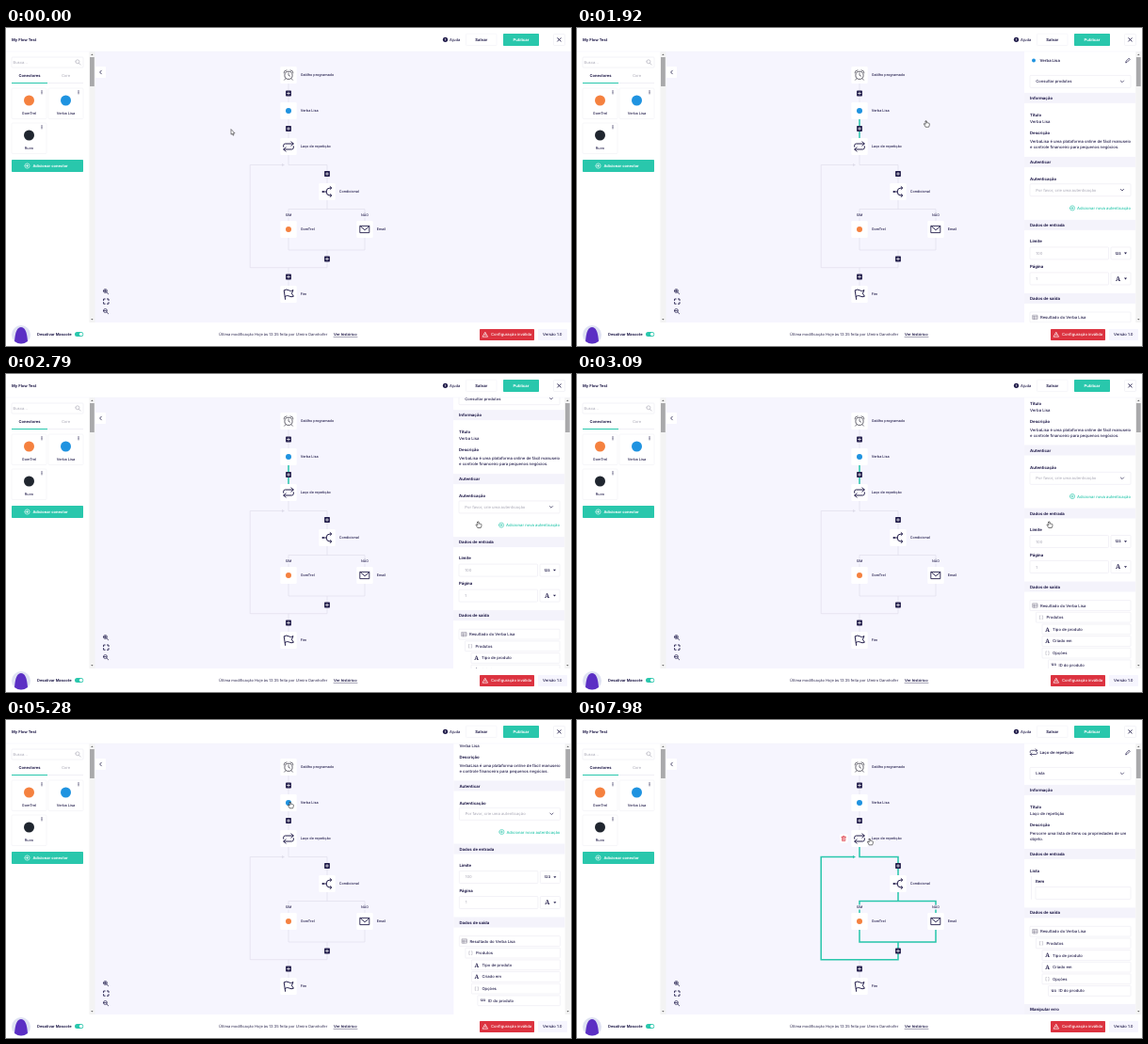
An HTML page for the animation above (8000 ms loop, 600 px wide and 338 px high).

```html
<!DOCTYPE html>
<html lang="pt-BR">
<head>
<meta charset="utf-8">
<title>Editor de fluxo</title>
<style>
html, body { margin: 0; width: 100%; height: 100%; overflow: hidden; background: #fff; }
svg { display: block; width: 600px; height: 338px; }
text { font-family: Inter, "Open Sans", sans-serif; text-rendering: geometricPrecision; white-space: pre; }
</style>
</head>
<body>
<svg id="stage" viewBox="0 0 600 338" xmlns="http://www.w3.org/2000/svg"></svg>
<script>
const INK = '#221d4b', TEAL = '#29c7ac', GREY = '#b3b2be', EDGE = '#dddbe9', LINE = '#e6e5ee',
      BACK = '#f6f5fe', RED = '#dc3340', BLUE = '#1f93e0', ORANGE = '#f5813f';
const APP = 'Verba Lisa', CRM = 'GomTrel';

// Drawing helpers: y of a text is its vertical centre.
const text = (x, y, s, size = 4.2, fill = INK, weight = 450, extra = '') =>
  `<text x="${x}" y="${y + size * .36}" font-size="${size}" fill="${fill}" font-weight="${weight}" ${extra}>${s}</text>`;
const bold = (x, y, s, size = 4.3, fill = INK, extra = '') => text(x, y, s, size, fill, 700, extra);
const MID = 'text-anchor="middle"';
const rect = (x, y, w, h, fill, r = 0, stroke = 'none') =>
  `<rect x="${x}" y="${y}" width="${w}" height="${h}" rx="${r}" fill="${fill}" stroke="${stroke}" stroke-width=".5"/>`;
const dot = (x, y, r, fill) => `<circle cx="${x}" cy="${y}" r="${r}" fill="${fill}"/>`;
const path = (d, stroke = INK, w = .8, fill = 'none') =>
  `<path d="${d}" fill="${fill}" stroke="${stroke}" stroke-width="${w}" stroke-linejoin="round" stroke-linecap="round"/>`;
const at = (x, y, body, k = 1) => `<g transform="translate(${x} ${y}) scale(${k})">${body}</g>`;
const group = (id, body) => `<g id="${id}">${body}</g>`;
const chevron = (x, y) => path(`M${x - 1.6} ${y - .8}l1.6 1.6 1.6 -1.6`, INK, .7);
const caret = (x, y) => `<path d="M${x - 1.5} ${y - .8}h3l-1.5 1.8z" fill="${INK}"/>`;

const icons = {
  loop: path('M-5.3 .2v-1.4q0-1.8 1.8-1.8h8.6M3-5.2l2.2 2.2L3-.8M5.3-.2v1.4q0 1.8-1.8 1.8h-8.6M-3 5.2l-2.2-2.2L-3 .8', INK, 1),
  branch: dot(-4.4, 0, 1.1, INK) + path('M-4 0h3M4.6-4H3Q-.8-4-.8 0T3 4h1.6M3.2-5.4l1.5 1.4-1.5 1.4M3.2 2.6l1.5 1.4-1.5 1.4', INK, 1),
  mail: path('M-4.8-3.6h9.6v7.2h-9.6zM-4.8-3.4L0 .8l4.8-4.2', INK, .9),
  flag: path('M-3.4 5.4L-4.8-4.2Q-2-5.8 .2-4.2T5-4.4L3.4-.8 5.4 2.2Q3 3.4 .8 2T-3.8 2.4', INK, 1),
  alarm: path('M-5-2.2q0-3 3-3M5-2.2q0-3-3-3M-3 3.6l-1.4 1.6M3 3.6l1.4 1.6M0-2v2.2l1.6 1', '#55535f', .8)
    + '<circle r="4.1" cy=".3" fill="none" stroke="#55535f" stroke-width=".9"/>',
  table: path('M-2.4-2.2h4.8v4.4h-4.8zM-2.4-.8h4.8M-2.4 .7h4.8M-.8-.8v3', '#5d5a72', .4),
  braces: path('M-1-1.8h-.6v3.6h.6M1-1.8h.6v3.6h-.6', '#908da0', .4),
  letter: `<text y="2.2" font-size="6.2" font-weight="700" fill="${INK}" ${MID} style="font-family:'Noto Serif',serif">A</text>`,
  digits: bold(0, 0, '123', 3.3, INK, MID),
  trash: path('M-2.3-1.7h4.6M-.8-1.8v-.8h1.6v.8M-1.8-1.6l.2 4.2h3.2l.2-4.2M-.6-.5v2M.6-.5v2', RED, .65),
  pencil: path('M-2.2 2.2l.4-1.5L1.1-2.2l1.1 1.1-2.9 2.9z', INK, .7),
  hand: path('M-.8 .7V4L-1.9 3.2Q-2.8 3-2.5 3.8L-.8 6.8H2.6Q3.4 5.4 3.4 3.4 3.3 2.7 2.5 2.7 1.6 2.2 .6 2.5V.7Q-.1-.3-.8 .7z', '#222', .6, '#fff'),
  arrow: path('M0 0v5.2l1.2-1 .9 2 .9-.4-.9-1.9h1.6z', '#222', .55, '#fff')
};

const node = (x, y, body, label) =>
  rect(x - 8.7, y - 8.9, 17.4, 17.8, '#fff', 1.2) + at(x, y, body) + text(x + 12.7, y, label, 3.76);
const plus = (x, y) => rect(x - 2.9, y - 2.9, 5.8, 5.8, INK, .7) + path(`M${x - 1.4} ${y}h2.8M${x} ${y - 1.4}v2.8`, '#fff', .7);
const plusRing = (x, y, c) => path(`M${x - 2.6} ${y}a2.6 2.6 0 1 0 5.2 0a2.6 2.6 0 1 0 -5.2 0M${x - 1.2} ${y}h2.4M${x} ${y - 1.2}v2.4`, c, .6);
const lens = (x, y, c, sign = '') => path(`M${x - 2.6} ${y - .5}a2 2 0 1 0 4 0a2 2 0 1 0 -4 0M${x + .9} ${y + 1}l1.8 1.8${sign}`, c, .7);

const LOOP = 'M300 135V145.5H341V165M341 183V192.5M300 205V192.5H381V205M300 223V236H381V223M341 236V254.7H259.2V145.5H294';
const loopEdges = (c, w) => `<path d="${LOOP}" fill="none" stroke="${c}" stroke-width="${w}"/>`
  + `<path d="M293 144l3 1.5-3 1.5z" fill="${c}"/>`;
const branchTag = (x, s) => rect(x - 4.5, 196.5, 9, 5, BACK) + text(x, 199, s, 3.6, INK, 550, MID);

function flow() {
  return rect(94, 25, 506, 288, BACK)
    + path('M300 59V117M300 255V274', EDGE, .6) + loopEdges(EDGE, .6)
    + group('linkOn', path('M300 97.5V116.5', TEAL, 1.5)) + group('loopOn', loopEdges(TEAL, 1.5))
    + branchTag(300, 'SIM') + branchTag(381, 'NÃO')
    + [[300, 69.5], [300, 107], [341, 155], [341, 245.5], [300, 264.5]].map(p => plus(...p)).join('')
    + node(300, 50, icons.alarm, 'Gatilho programado')
    + node(300, 88, dot(0, 0, 3, BLUE), APP)
    + node(300, 126, icons.loop, 'Laço de repetição')
    + node(341, 174, icons.branch, 'Condicional')
    + node(300, 214, dot(0, 0, 3, ORANGE), CRM)
    + node(381, 214, icons.mail, 'Email')
    + node(300, 283, icons.flag, 'Fim')
    + group('trash', rect(279, 121.5, 8.5, 9, '#fff', 1) + at(283.2, 126, icons.trash))
    + rect(95, 41, 11, 12, '#fff', 1) + path('M101.3 45.2l-1.7 1.8 1.7 1.8', INK, .8)
    + lens(106, 280, INK, `M${104.4} 279.5h2M105.4 278.5v2`) + lens(106, 301, INK, 'M104.4 300.5h2')
    + path('M103.6 289.6v-1.6h1.6M107.4 288h1.6v1.6M109 291.6v1.6h-1.6M105.2 293.2h-1.6v-1.6', INK, .9);
}

const scrollbar = (x, w) => rect(x, 25, w, 288, '#f3f3f3') + rect(x + .6, 31, w - 1.2, 31, '#a9a9ab')
  + `<path d="M${x + w / 2 - 1.2} 29h2.4l-1.2-1.6zM${x + w / 2 - 1.2} 309h2.4l-1.2 1.6z" fill="#666"/>`;

const card = (x, y, color, label) => rect(x, y, 37, 32.5, '#fff', 1, '#ececf3')
  + dot(x + 18.5, y + 13, 5.5, color) + text(x + 18.5, y + 26.5, label, 3.85, INK, 450, MID)
  + [-1.4, 0, 1.4].map(d => dot(x + 32, y + 4.3 + d, .55, INK)).join('');

function sidebar() {
  return rect(0, 25, 88, 288, '#fff') + scrollbar(88.4, 6)
    + rect(6, 31, 76, 11, '#fff', .8, LINE) + text(7.5, 36.5, 'Busca...', 4, GREY) + lens(76.5, 36.3, GREY)
    + bold(25, 50.5, 'Conectores', 4.05, INK, MID) + text(63.5, 50.5, 'Core', 4, GREY, 450, MID)
    + rect(44, 58, 38, .6, LINE) + rect(6, 58, 38, 1, TEAL)
    + card(6, 64, ORANGE, CRM) + card(45, 64, BLUE, APP) + card(6, 101, '#20262f', 'Ruvo')
    + rect(6, 140, 76, 13, TEAL, .8) + plusRing(22.5, 146.5, '#fff') + bold(28.4, 146.3, 'Adicionar conector', 4, '#fff');
}

function header() {
  return rect(0, 0, 600, 25, '#fff') + path('M0 25H600', '#f0eff6', .4)
    + bold(6, 12.4, 'My Flow Test', 4.1)
    + dot(466.5, 12.3, 2.6, INK) + bold(466.5, 12.3, '?', 3.6, '#fff', MID) + text(471, 12.4, 'Ajuda', 4.1)
    + rect(488.5, 6.2, 32.5, 12.4, '#fff', .8, '#efeef4') + bold(504.8, 12.4, 'Salvar', 4.2, INK, MID)
    + rect(528, 6, 38, 13, TEAL, .8) + bold(547, 12.4, 'Publicar', 4.2, '#fff', MID)
    + rect(581.5, 6.5, 12, 12, '#fff', .8, '#e9e8f0') + path('M585.7 10.7l3.4 3.4M589.1 10.7l-3.4 3.4', INK, .9);
}

function footer() {
  return rect(0, 313, 600, 25, '#fff')
    + dot(16, 326, 10, '#dfe2f2') + '<path d="M9 333Q10 318 16 318T23 333Q16 338 9 333z" fill="#5b2fc4"/>'
    + bold(33, 325.5, 'Desativar Mascote', 4)
    + rect(73, 323, 9.2, 5, TEAL, 2.5) + dot(79.7, 325.5, 1.8, '#fff')
    + text(226, 325.6, 'Última modificação Hoje às 13:35 feita por Ulmiro Dannhofer', 4, '#4a4668')
    + text(348, 325.6, 'Ver histórico', 4, INK, 600) + path('M348 328.4H373', INK, .4)
    + rect(503, 320, 58, 12, RED, .8)
    + path('M509 323.6l2.6 4.6h-5.2zM509 325.4v1.2', '#fff', .7) + text(515, 325.8, 'Configuração inválida', 4.15, '#fff', 500)
    + rect(565, 320, 31, 12, BACK, .8) + text(570, 325.6, 'Versão 1.0', 4.15);
}

// Side panel parts.
const band = (y, s) => rect(475, y - 5.5, 118, 11, '#f4f3fb') + bold(481, y, s, 4.3);
const field = (y, s, color = GREY, x = 481, w = 107) => rect(x, y - 6.5, w, 13, '#fff', .8, LINE) + text(x + 6.3, y, s, 4.15, color);
const select = (y, s, color) => field(y, s, color) + chevron(579, y);
const typed = (y, label, value, kind) => bold(481, y, label) + field(y + 12.7, value, GREY, 481, 83.5)
  + rect(567, y + 6.2, 21, 13, '#fff', .8, LINE) + at(574.5, y + 12.7, icons[kind], 1.1) + caret(582.5, y + 12.7);
const info = (name, lines) => band(75, 'Informação') + bold(481, 93, 'Título') + text(481, 100.3, name, 4.25)
  + bold(481, 112.2, 'Descrição') + lines.map((s, i) => text(481, 121 + 6.1 * i, s, 4.25)).join('');
const panelHead = (mark, s) => mark + text(491.5, 35, s, 4.2, INK, 600) + at(585, 35, icons.pencil);

const TREE = [[0, 'table', 'Resultado do ' + APP], [1, 'braces', 'Produtos'], [2, 'letter', 'Tipo de produto'],
  [2, 'letter', 'Criado em'], [2, 'braces', 'Opções'], [3, 'digits', 'ID do produto']];
const tree = y0 => TREE.map(([depth, icon, s], i) => {
  const x = 481 + 6.5 * depth, y = y0 + 12.65 * i;
  return rect(x, y - 5.4, 588 - x, 10.8, '#fff', .6, LINE)
    + at(x + 5.5, y, icons[icon]) + text(x + 11, y, s, 4.2);
}).join('');

const appPanel = () => panelHead(dot(485, 35, 2, BLUE), APP)
  + select(57.5, 'Consultar produtos', INK)
  + info(APP, ['VerbaLisa é uma plataforma online de fácil manuseio', 'e controle financeiro para pequenos negócios.'])
  + band(143, 'Autenticar') + bold(481, 161, 'Autenticação')
  + select(172.8, 'Por favor, crie uma autenticação')
  + plusRing(526, 192, TEAL) + text(588, 192, 'Adicionar nova autenticação', 4.2, TEAL, 500, 'text-anchor="end"')
  + band(210, 'Dados de entrada') + typed(227.3, 'Limite', '100', 'digits') + typed(254.3, 'Página', '1', 'letter')
  + band(288, 'Dados de saída') + tree(308);

const loopPanel = () => panelHead(at(485, 35, icons.loop, .7), 'Laço de repetição')
  + select(57.5, 'Lista', INK)
  + info('Laço de repetição', ['Percorre uma lista de itens ou propriedades de um', 'objeto.'])
  + band(143, 'Dados de entrada') + bold(481, 161, 'Lista') + path('M482.5 167V191', LINE, .5)
  + bold(487, 172, 'Item') + field(184.5, '', GREY, 487, 101)
  + band(205.5, 'Dados de saída') + tree(225.3) + band(308, 'Manipular erro');

const $ = id => document.getElementById(id);
const panelBody = at(0, -.6, group('appPanel', appPanel()) + group('loopPanel', loopPanel()));
$('stage').innerHTML = flow() + sidebar()
  + group('panel', rect(475, 25, 125, 288, '#fff') + panelBody + scrollbar(593.3, 6))
  + header() + footer()
  + group('arrow', icons.arrow) + group('hand', icons.hand);

// Motion: each step is [start, end, value, easing].
const inOut = p => p < .5 ? 2 * p * p : 1 - 2 * (1 - p) ** 2;
const cubic = p => p < .5 ? 4 * p ** 3 : 1 - 4 * (1 - p) ** 3;
const out = p => 1 - (1 - p) ** 2;
const track = (first, steps) => t => steps.reduce((v, [a, b, to, ease]) =>
  t <= a ? v : v + (to - v) * ease(Math.min(1, (t - a) / (b - a))), first);

const cursorX = track(239, [[15, 690, 302, inOut], [1655, 2295, 501.6, inOut], [4095, 4800, 302, inOut],
  [5840, 6360, 304, inOut], [7600, 7980, 311, inOut]]);
const cursorY = track(108, [[15, 690, 87, inOut], [1655, 2295, 156.7, p => inOut(p) ** 1.7],
  [4095, 4800, 87, p => 1 - (1 - inOut(p)) ** 1.7], [5840, 6360, 124, inOut], [7600, 7980, 126, inOut]]);
const slide = track(125, [[1250, 1550, 0, out], [5270, 5550, 125, inOut], [7400, 7700, 0, out]]);
const scroll = track(0, [[2505, 2830, 31, cubic], [2955, 3180, 67, out], [3440, 3690, 72.4, inOut]]);

const show = (id, on) => $(id).style.display = on ? '' : 'none';
const move = (id, x, y) => $(id).setAttribute('transform', `translate(${x} ${y})`);

function render(t) {
  const x = cursorX(t), y = cursorY(t), overNode = x > 291;
  move('arrow', x, y);
  move('hand', x, y);
  show('arrow', !overNode);
  show('hand', overNode);
  move('panel', slide(t), 0);
  move('appPanel', 0, -scroll(t));
  show('appPanel', t < 7000);
  show('loopPanel', t >= 7000);
  show('linkOn', t >= 1260 && t < 5280);
  show('loopOn', t >= 7410);
  show('trash', t > 5850 && y > 117);
}

const start = performance.now();
(function tick() {
  render((performance.now() - start) % 8000);
  requestAnimationFrame(tick);
})();
</script>
</body>
</html>
```
